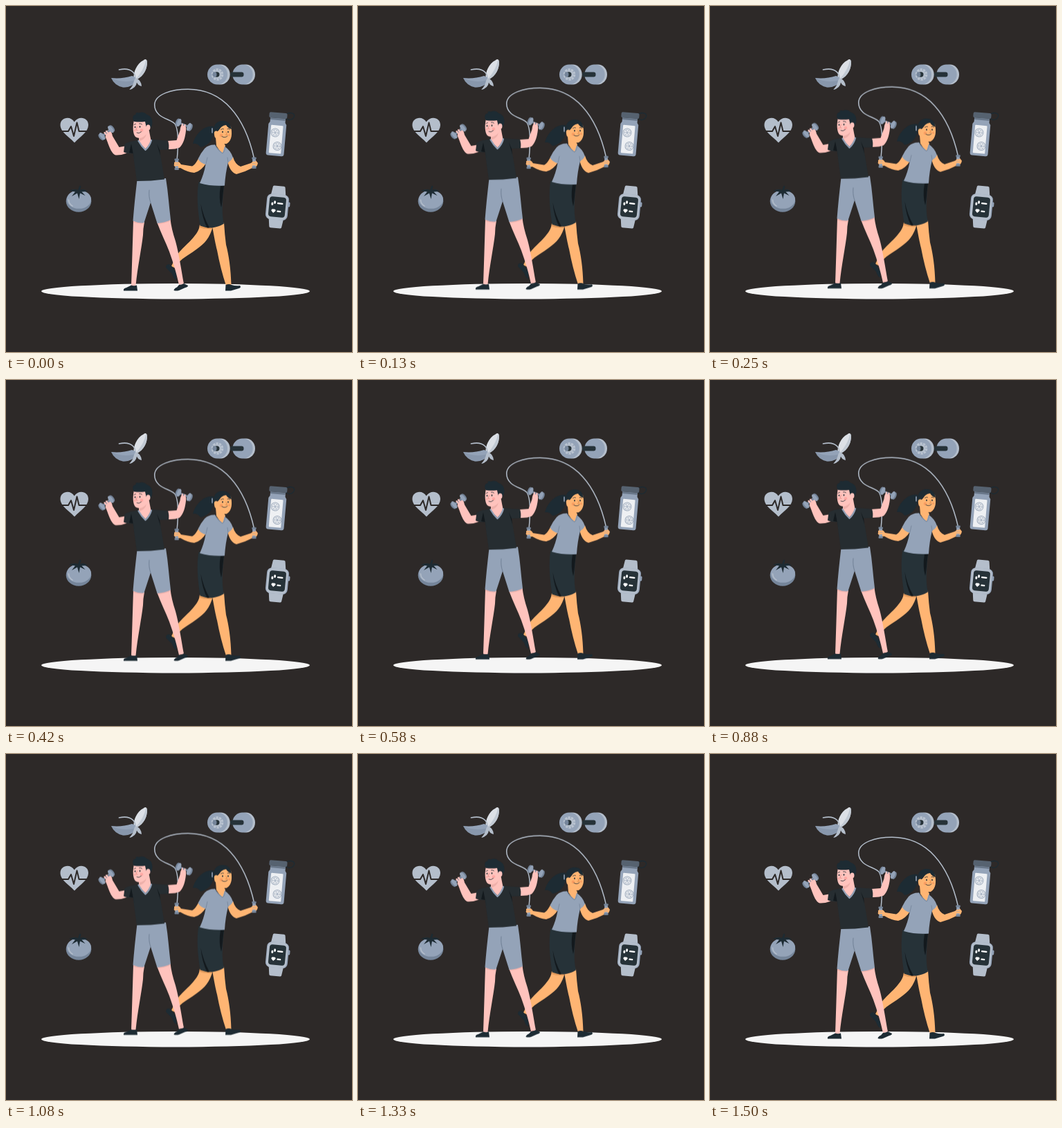
An HTML page without scripts that plays this animation: 500 by 500 pixels, repeating every 1540 ms.

```html
<!DOCTYPE html>
<html lang="en">
<head>
<meta charset="utf-8">
<title>Fitness couple</title>
<style>
  html, body { margin: 0; height: 100%; overflow: hidden; background: #2d2928; }
  svg { display: block; width: 100%; height: 100%; }
  .slate { fill: #94a3b8; }
  .slate-dark { fill: #75859a; }
  .silver { fill: #b4becb; }
  .pale { fill: #dce0e6; }
  .dark { fill: #263238; }
  .hair { fill: #1d2b33; }
  .shirt { fill: #262d31; }
  .shade { fill: #13191d; }
  .pink { fill: #ffc3bd; }
  .tan { fill: #ffb573; }
  .line { fill: none; stroke-linecap: round; stroke-linejoin: round; }
  .ink { stroke: #263238; }
  .steel { stroke: #94a3b8; }
  .bob { animation: bob 1540ms linear infinite; }
  @keyframes bob {
    0%, 97.2%, 100% { transform: translateY(0); }
    48.5% { transform: translateY(-10px); }
  }
</style>
</head>
<body>
<svg viewBox="0 0 500 500">
  <defs>
    <g id="weight">
      <rect class="slate-dark" x="-10" y="-1.5" width="20" height="3"/>
      <g id="disc">
        <ellipse class="slate-dark" cx="10" rx="2.800" ry="5.600"/>
        <ellipse class="slate" cx="7.800" rx="2.800" ry="6"/>
      </g>
      <use href="#disc" transform="scale(-1 1)"/>
    </g>
    <g id="citrus" class="line" stroke="#a3afbf" stroke-width="1">
      <circle r="6"/>
      <circle r="4.4" stroke-width=".6"/>
      <path d="M-4 0H4M-2-3.5 2 3.5M2-3.5-2 3.5" stroke-width=".8"/>
    </g>
    <g id="handle">
      <rect class="slate" x="-2.3" y="-7" width="4.6" height="15" rx="1"/>
      <rect class="slate-dark" x="-3.2" y="-7.5" width="6.4" height="3" rx="1"/>
      <rect class="slate-dark" x="-3.2" y="6" width="6.4" height="3" rx="1"/>
    </g>
  </defs>

  <ellipse cx="245" cy="412.2" rx="194" ry="11.2" fill="#f5f5f5"/>

  <g id="heart">
    <path class="silver" d="M99 197.500C91 189 78.500 182 78.500 172C78.500 161 93 158 98.700 167.500C105 158 119 161 119 172C119 182 107 189 99 197.500Z"/>
    <path class="line" d="M79 181H90L94 174 98 188 102.500 168.500 105.500 181H119" stroke="#2d2928" stroke-width="2"/>
  </g>

  <g id="tomato">
    <ellipse class="slate-dark" cx="105" cy="282" rx="18.300" ry="15.700"/>
    <ellipse class="slate" cx="105.500" cy="279.500" rx="17.600" ry="13.300"/>
    <path class="line" d="M90.500 280Q91 286 96 289" stroke="#b4becb" stroke-width="1.500"/>
    <path class="hair" d="M91 267Q98 263.500 104 266L106.500 259.500 108.500 260.500 107 266Q113 263.500 118 268L109.500 268.500 114.500 274 107 270.500 105.500 279 103 270.500 95 275 100 268.500Z"/>
  </g>

  <g id="banana">
    <path class="pale" d="M184.500 104C184 96 189 83 198.500 78.500Q203 75 203.800 80C204.500 91 199 101 189 106Z"/>
    <path d="M188 105C194 98 200 89 202 79Q203.500 77 203.800 80C204.500 91 199 101 189 106Z" fill="#c2cad4"/>
    <path class="line" d="M163.500 92Q177 89 183.500 95.500Q187 99 187 104" stroke="#b4becb" stroke-width="1.700"/>
    <path class="slate" d="M152 104Q168 105.500 182 101Q189 102 188 109Q181 118.500 169 117.500Q157 115 152 104Z"/>
    <path class="slate-dark" d="M152 104Q168 112 188 107Q181 118.500 169 117.500Q157 115 152 104Z" opacity=".4"/>
    <path class="silver" d="M187 104Q195 106 196 116Q191 115 189 110.500Q188 119 178 121Q184 115 185 108Z"/>
  </g>

  <g id="dumbbell">
    <ellipse class="silver" cx="310" cy="99" rx="13.700" ry="14.400"/>
    <ellipse class="slate" cx="305.500" cy="99" rx="14.500" ry="14.400"/>
    <circle cx="305.500" cy="99" r="7" fill="none" stroke="#b9c3d0" stroke-width="3.600" stroke-dasharray="3.200 1.200"/>
    <circle class="silver" cx="305.500" cy="99" r="6"/>
    <ellipse class="dark" cx="304.500" cy="99" rx="4" ry="3.700"/>
    <ellipse class="slate-dark" cx="301.500" cy="99" rx="3" ry="3.700"/>
    <ellipse class="silver" cx="346.500" cy="99" rx="13.500" ry="14.400"/>
    <ellipse class="slate" cx="342" cy="99" rx="14.700" ry="14.400"/>
    <rect class="dark" x="324" y="95.500" width="19.500" height="7" rx="3"/>
  </g>

  <g id="bottle" transform="rotate(5 391 186)">
    <path class="line" d="M402 155C411 150 418 155 412 161Q408 165 402 161" stroke="#1d2b33" stroke-width="1.300"/>
    <path class="slate" d="M380 162H402V168L404 171V213Q404 216.500 400.500 216.500H381.500Q378 216.500 378 213V171L380 168Z"/>
    <path d="M380 162H402V165H380Z" fill="#6a788a"/>
    <rect x="378" y="154" width="26" height="8" rx="2" fill="#566270"/>
    <rect x="382" y="172.500" width="17.500" height="40.500" rx="1" fill="#eef0f3"/>
    <use href="#citrus" x="388.700" y="183.200"/>
    <use href="#citrus" x="393.400" y="202.300"/>
  </g>

  <g id="watch" transform="rotate(5.500 392 290)">
    <path class="silver" d="M383 262Q383 260 385 260H399Q401 260 401 262L403 275H381ZM381 305H403L401 319Q401 321 399 321H385Q383 321 383 319Z"/>
    <rect class="slate" x="406.500" y="282" width="3.500" height="7" rx="1.500"/>
    <rect class="slate" x="376" y="272" width="32" height="37" rx="7"/>
    <rect class="silver" x="377" y="272" width="29.500" height="37" rx="7"/>
    <rect class="dark" x="380" y="276" width="24" height="29" rx="4"/>
    <g fill="#fff">
      <ellipse cx="384.500" cy="286.500" rx="1.500" ry="2.300"/>
      <ellipse cx="388" cy="284" rx="1.500" ry="2.300"/>
      <rect x="391.500" y="284" width="8.500" height="2.200" rx="1"/>
      <path d="M387 299.500 384 296.500Q383.500 293 387 294Q390.500 293 390 296.500Z"/>
      <rect x="392" y="295.500" width="6" height="2.200" rx="1"/>
    </g>
  </g>

  <g class="bob">
    <path class="line" d="M247 223C249 203 250 181 244.500 171C240 163 214.700 163 214.700 142.500C215.500 127 240 120.300 263 120.300C314 120.300 345 160 358.500 220" stroke="#b4becb" stroke-width="1.500"/>

    <g id="woman">
      <path class="hair" d="M300 174C290 172.500 283 178 277 185Q272 191 270 199Q277 198 281 204Q292 202 297 193Q300 188 301 181Z"/>
      <path class="tan" d="M280 316C279 330 263 342 250 356Q243 366 239 376L245 379Q247 372 255 365.500C267 357 283 348 290 338Q296 330 299 318Z"/>
      <path d="M280 316 279.500 320Q288 323 298 322L299 318Z" fill="#e39a5b"/>
      <path class="hair" d="M231.500 375Q235 371.500 239 375.500L246 385V396Q242 394 240 387L231 378Z"/>
      <path class="tan" d="M298 318C301 335 303 345 305 353Q310 380 318 404H325.500C325 380 322 360 318 345Q316 330 315 313Z"/>
      <path class="hair" d="M317.500 403Q322 401 326 403Q332 405 338 404Q341 407 335 408.500L325 411.500H317Z"/>
      <path class="dark" d="M278.500 254C275 272 277 295 280.500 317.500Q289 321 298 320.500Q308 319 315 314.500C311 300 313 278 315.500 257Z"/>
      <path class="shade" d="M310 260H315C313 272 313 284 311 291Q307 278 310 260ZM281.500 286Q285 304 294 320.500H290.500Q283 305 281.500 286Z"/>

      <path class="tan" d="M279 219C275 225 274 229 269 231.500L253 229Q250 224 245 223.500L242.500 230Q245 235 252 234Q262 240 272 241Q282 239 290 226Z"/>
      <path class="tan" d="M320 224C322 233 326 241 333 243Q345 240 355 234.500Q363 234 364 227L360 222 354 227 339 232Q331 229 328 218Z"/>
      <path class="tan" d="M303 190 304 202Q308 209 313 213Q318 207 317 202L314 196Z"/>
      <path class="slate" d="M302 200.500Q293 200 287 206Q281 213 277.500 221Q281 227 288.500 229Q286 243 280 256Q298 261 316 259.500Q317 242 321 226Q326 223 328 219Q325 209 316 203L313 212Q306 207 302 200.500Z"/>
      <path class="line" d="M302 201Q306 209 313 213Q317 209 316.500 203M289 228 291 219M321 226 320 219" stroke="#7a8a9f" stroke-width="1"/>

      <path class="tan" d="M303 174Q312 166 325 174C327 184 327 194 319 199Q311 200.500 306 193Q299 190 302 182Z"/>
      <path class="hair" d="M301 186C297.500 172 305 165.500 314 166Q323.500 166 326 178Q321 177 318 172Q311 173 308 179L305 182Z"/>
      <ellipse class="tan" cx="303.700" cy="184" rx="2.900" ry="3.600"/>
      <path class="line" d="M298 177V183" stroke="#94a3b8" stroke-width="1.600"/>
      <g fill="#f2844f" opacity=".45">
        <circle cx="311" cy="187" r="2.300"/>
        <circle cx="322.500" cy="186.500" r="1.600"/>
      </g>
      <ellipse class="dark" cx="313" cy="182" rx=".9" ry="1.200"/>
      <ellipse class="dark" cx="321" cy="182" rx=".9" ry="1.200"/>
      <path class="line ink" d="M310.500 178.500Q312.500 176.800 314.500 177.700M320 177.700Q322 176.800 323.500 178.200M312 188.500Q316.500 191.500 320 187.800" stroke-width=".8"/>
      <path class="line" d="M318 182 319.500 186 317 186.200" stroke="#d9803f" stroke-width=".8"/>

      <use href="#handle" x="246.700" y="228"/>
      <use href="#handle" x="358.500" y="226"/>
      <path class="line" d="M244 227H248M244.500 230H248.500M357 226H361M357 229H361" stroke="#ffb573" stroke-width="2.300"/>
    </g>

    <g id="man">
      <path class="pink" d="M184 310C183 340 182 375 181 404H187.500C190 378 196 350 198 331Q198 322 200 312Z"/>
      <path class="pink" d="M218 312C224 328 231 342 236 355Q245 380 250 403L257 401.500C253 380 250 358 245 340Q239 322 237.500 308Z"/>
      <path class="line" d="M184.500 312Q192 314.500 199 313.500M219.500 314Q230 313.500 237 310" stroke="#eeb0aa" stroke-width="1.400"/>
      <path class="hair" d="M181 403.500Q185 405 189 403.500L190 411.500H170Q169 408 174 407Z"/>
      <path class="hair" d="M250 403Q254 403 257 401L263 404Q263 406 259 407L250 411Q246 412 242.500 411Q243 408 247 406.500Z"/>
      <path class="slate" d="M189.500 251C187 272 185 291 183.500 310.500Q191 314 199.500 313.300L209 284 218.500 314Q230 313 238 309C235.500 290 234.500 270 231 249Z"/>
      <path class="line" d="M209 284Q206 276 207 266" stroke="#75859a" stroke-width="1.100"/>

      <path class="pink" d="M143.500 189C148 198 151 213 158.500 215.500Q166 216 175 212.500L172 202.500 163.500 204 154 188Q153 180 147 179Z"/>
      <path class="pink" d="M233 195 246.500 194 251.500 180Q252 171 257 170.500Q261 173 260 180C259 190 256.500 199 251 204.500Q244 207.500 234 207Z"/>
      <path class="shirt" d="M192 194Q178 195 171.500 199.500L170 211Q175 214 183.500 213L189 253Q210 253 229 250.500L222 208 235 207.500Q236 200 234 194.500Q222 194 209 192.500L201 206Z"/>
      <path class="shade" d="M183.500 213 181 199 178 212ZM183 209 181 199 186 222ZM222 208 218 199 223 216Z"/>
      <path class="pink" d="M192 188V195Q196 202 201.500 206.500Q207 201 209.500 194L206 176Z"/>
      <path class="line steel" d="M191.500 195Q196 203 201.500 208Q208 202 210 194" stroke-width="2.200"/>

      <path class="pink" d="M185 165C183 174 183 184 187 189Q192 193 199 188Q204 186 206 178L204 162Z"/>
      <path d="M192 191Q198 191 203 185Q201 193 193 195Z" fill="#eeb0aa"/>
      <path class="hair" d="M185 167C182 163 183 157 187.500 157Q187 153 192 154.500Q199 152 203 156.500Q211 159 211.500 168Q211.500 176 206 179L202.500 174 201 167Q193 168 185 167Z"/>
      <ellipse class="pink" cx="205.500" cy="175.500" rx="3" ry="3.900"/>
      <g fill="#ff8f8a" opacity=".5">
        <circle cx="196" cy="179.500" r="2.300"/>
        <circle cx="186" cy="180" r="1.500"/>
      </g>
      <ellipse class="dark" cx="186.500" cy="175" rx=".9" ry="1.200"/>
      <ellipse class="dark" cx="193.500" cy="174.500" rx=".9" ry="1.200"/>
      <path class="line ink" d="M185 171.500 187.500 170.500M192.500 170Q195 169.500 196.500 171M189 183.200Q192 185.200 195.500 181.800" stroke-width=".8"/>
      <path class="line" d="M189.500 174.500 187.800 179 190 179.500" stroke="#e08983" stroke-width=".8"/>

      <use href="#weight" transform="translate(145.300 183.200) rotate(-39)"/>
      <use href="#weight" transform="translate(257.200 171.700) rotate(23)"/>
      <path class="line" d="M142.500 183 146 187M145 181 149 185.500M255 171 254.500 175.500M258.500 172 258 177" stroke="#ffc3bd" stroke-width="2.300"/>
    </g>
  </g>
</svg>
</body>
</html>
```
